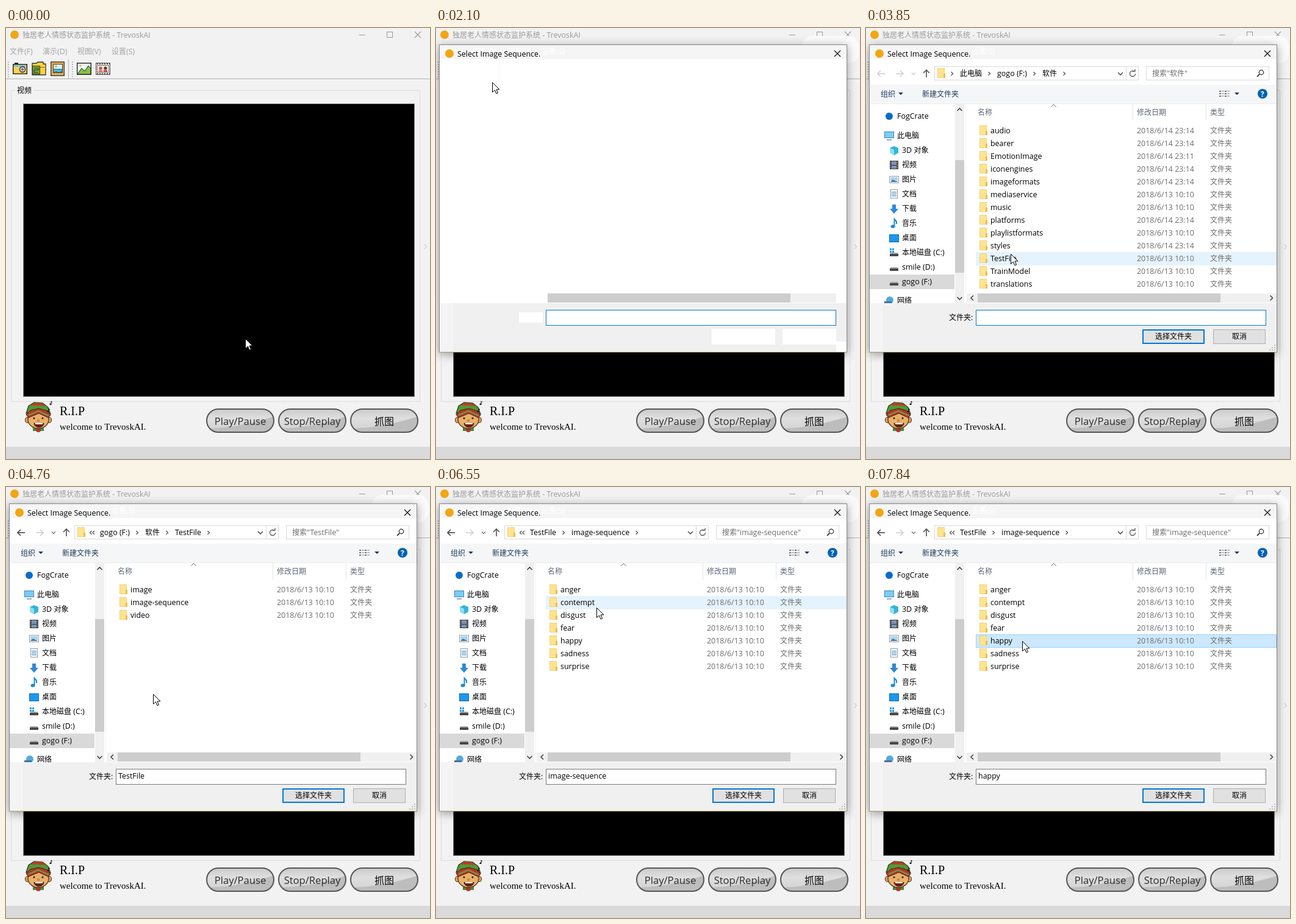
These frames come from a looping animation (695x708 px, 8 s). An HTML page with a canvas:

```html
<!DOCTYPE html>
<html lang="zh-CN">
<head>
<meta charset="utf-8">
<style>
html, body { margin: 0; width: 100%; height: 100%; overflow: hidden; background: #f2f2f2; }
canvas { display: block; width: 100vw; height: 100vh; }
</style>
</head>
<body>
<canvas id="stage" width="695" height="708"></canvas>
<script>
const ctx = document.getElementById('stage').getContext('2d', { alpha: false });
const LOOP = 8000;
const APP = 'TrevoskAI';
const MENU = [['文件(F)', 6], ['演示(D)', 60], ['视图(V)', 117], ['设置(S)', 173]];

// ---------- drawing helpers ----------
function rect(x, y, w, h, fill, stroke, width = 1) {
  if (fill) { ctx.fillStyle = fill; ctx.fillRect(x, y, w, h); }
  if (stroke) {
    ctx.strokeStyle = stroke; ctx.lineWidth = width;
    ctx.strokeRect(x + width / 2, y + width / 2, w - width, h - width);
  }
}
function shape(points, fill, stroke, width = 1, close = !!fill) {
  ctx.beginPath();
  points.forEach(([x, y]) => ctx.lineTo(x, y));
  if (close) ctx.closePath();
  if (fill) { ctx.fillStyle = fill; ctx.fill(); }
  if (stroke) { ctx.strokeStyle = stroke; ctx.lineWidth = width; ctx.stroke(); }
}
function oval(x, y, rx, ry, fill, stroke, width = 1, from = 0, to = 7) {
  ctx.beginPath();
  ctx.ellipse(x, y, rx, ry, 0, from, Math.min(to, Math.PI * 2));
  if (fill) { ctx.fillStyle = fill; ctx.fill(); }
  if (stroke) { ctx.strokeStyle = stroke; ctx.lineWidth = width; ctx.stroke(); }
}
const dot = (x, y, r, fill) => oval(x, y, r, r, fill);

// Chinese and Latin runs use slightly different sizes.
function runs(s, size) {
  return s.match(/[\u3000-\u9fff]+|[^\u3000-\u9fff]+/g).map(part => {
    const font = part[0] >= '\u3000'
      ? `${size}px "Noto Sans CJK SC", "Noto Sans CJK", sans-serif`
      : `${size * 1.037}px "Open Sans", "Noto Sans", sans-serif`;
    ctx.font = font;
    return { part, font, width: ctx.measureText(part).width };
  });
}
function text(s, x, cy, color = '#000', size = 12, centered = false) {
  const list = runs(s, size);
  const total = list.reduce((sum, r) => sum + r.width, 0);
  let at = centered ? x - total / 2 : x;
  ctx.fillStyle = color;
  for (const r of list) {
    ctx.font = r.font;
    ctx.fillText(r.part, at, cy + size * 0.37);
    at += r.width;
  }
  return total;
}
function chevron(x, y, dx, dy, color = '#555', width = 1.3) {
  const s = Math.max(Math.abs(dx), Math.abs(dy));
  const points = dx ? [[x - dx / 2, y - s], [x + dx / 2, y], [x - dx / 2, y + s]]
                    : [[x - s, y - dy / 2], [x, y + dy / 2], [x + s, y - dy / 2]];
  shape(points, null, color, width);
}
function arrow(x, y, dx, dy, color) {
  shape([[x - 6 * dx, y - 6 * dy], [x + 6 * dx, y + 6 * dy]], null, color, 1.6);
  shape([[x + dx - 5 * dy, y + dy - 5 * dx], [x + 6 * dx, y + 6 * dy],
         [x + dx + 5 * dy, y + dy + 5 * dx]], null, color, 1.6);
}
function cross(x, y, r, color) {
  shape([[x - r, y - r], [x + r, y + r]], null, color, 1.1);
  shape([[x + r, y - r], [x - r, y + r]], null, color, 1.1);
}
function folder(x, y) {
  rect(x, y, 12, 16, '#ffe38f');
  rect(x, y, 12, 16, null, '#f1d27a');
  rect(x + 10, y + 9, 3, 7, '#e9bf50');
}

// ---------- main window ----------
function toolbar(hover) {
  if (hover) rect(70, 52, 31, 31, '#d8eafa', '#9fcdf0');
  for (const x of [3, 108]) for (let y = 55; y < 81; y += 4) rect(x, y, 1.5, 2, '#aaa');
  rect(102, 51, 1, 32, '#b5b5b5');
  rect(0, 83, 695, 1, '#adadad');

  rect(11, 59, 24, 17, '#ffd34f', '#222', 1.4);
  rect(13, 61, 20, 3, '#7cc6e8');
  rect(14, 57, 6, 2, '#222');
  oval(27, 68, 4.5, 4.5, '#d9d9d9', '#222', 1.3);
  dot(27, 68, 2, '#666');

  shape([[43, 58], [50, 58], [52, 56], [61, 56], [61, 59], [65, 59], [65, 77], [43, 77]], '#ffd23f', '#333', 1.3);
  rect(43, 62, 13, 14, '#7fa92f', '#333');
  shape([[46, 66], [53, 66], [53, 69], [46, 69], [46, 73], [53, 73]], null, '#243d12', 1.2);
  rect(56, 64, 7, 1, '#8a6b12');

  rect(73, 55, 23, 24, '#f0b04c', '#3c3c3c', 1.4);
  rect(77, 59, 16, 15, '#d7f0fa', '#3c3c3c');
  rect(78, 67, 14, 6, '#2695b5');
  dot(82, 63, 2, '#f6b52e');
  shape([[78, 71], [82, 69], [86, 71], [91, 69]], null, '#bfe6f2');

  rect(116, 57, 24, 20, '#e9f6ff', '#222', 1.4);
  shape([[117, 76], [124, 66], [129, 71], [135, 62], [139, 67], [139, 76]], '#84c441', '#222');
  dot(122, 62, 1.7, '#f3b72e');

  rect(147, 57, 24, 20, '#e6dedb', '#555');
  for (let x = 149; x < 170; x += 4) { rect(x, 58, 2, 2, '#555'); rect(x, 74, 2, 2, '#555'); }
  rect(149, 61, 20, 12, '#f8e9dd', '#777');
  dot(155, 66, 2.6, '#b35c43'); dot(163, 66, 2.6, '#54343a');
  rect(152, 69, 6, 3, '#e88068'); rect(160, 69, 6, 3, '#d34f4c');
}
function elf() {
  rect(44, 653, 18, 9, '#3f8f3b');
  dot(53, 660, 4, '#b8322c');
  oval(35, 644, 3.5, 4.5, '#dca060', '#54351c');
  oval(71, 644, 3.5, 4.5, '#dca060', '#54351c');
  oval(53, 643, 17, 15, '#e9b069', '#54351c', 1.3);
  shape([[33, 633], [37, 621], [46, 615], [60, 616], [69, 623], [73, 634], [65, 630], [53, 628], [41, 630]], '#4f9a35', '#263a16', 1.2);
  shape([[39, 620], [47, 616], [60, 617], [66, 621], [52, 620]], '#c93528');
  shape([[33, 635], [40, 628], [54, 625], [68, 629], [73, 636], [69, 640], [54, 633], [37, 640]], '#b8352c', '#4b1c15', 1);
  shape([[37, 636], [53, 629], [70, 637]], null, '#66a442', 2);
  dot(46, 641, 1.6, '#222'); dot(60, 641, 1.6, '#222');
  dot(53, 645, 2.3, '#cf8746');
  oval(54, 649, 8, 7, '#6d1f1a', '#35150e', 1, 0, Math.PI);
  rect(48, 649, 12, 2, '#fff');
  for (const [x, y] of [[69, 628], [73, 616]]) {
    oval(x, y + 2, 1.6, 1.2, '#111');
    shape([[x + 1, y + 2], [x + 1, y - 3], [x + 3, y - 1]], null, '#111');
  }
}
function pillButton(x, label) {
  const y = 625, w = 112, h = 40;
  const glass = ctx.createLinearGradient(0, y, 0, y + h);
  glass.addColorStop(0, '#c9c9c9');
  glass.addColorStop(0.4, '#dfdfdf');
  glass.addColorStop(1, '#d0d0d0');
  ctx.save();
  ctx.beginPath();
  ctx.roundRect(x + 1, y + 1, w - 2, h - 2, 19);
  ctx.fillStyle = glass;
  ctx.fill();
  ctx.save();
  ctx.clip();
  ctx.beginPath();
  ctx.moveTo(x, y + 33);
  ctx.bezierCurveTo(x + 45, y + 32, x + 75, y + 24, x + w, y + 13);
  ctx.lineTo(x + w, y + h);
  ctx.lineTo(x, y + h);
  ctx.fillStyle = '#bdbdbd';
  ctx.fill();
  ctx.restore();
  ctx.beginPath();
  ctx.roundRect(x + 1, y + 1, w - 2, h - 2, 19);
  ctx.strokeStyle = '#555';
  ctx.lineWidth = 2;
  ctx.stroke();
  ctx.restore();
  text(label, x + w / 2, 646, label === '抓图' ? '#000' : '#2b2b2b', 16, true);
}
function mainWindow(t) {
  rect(0, 0, 695, 708, '#f2f2f2');
  const titleColor = t >= 590 && t < 900 ? '#000' : '#999';
  dot(14, 11, 7, '#f2a614');
  text('独居老人情感状态监护系统 - ' + APP, 27, 12, titleColor);
  rect(579, 11, 10, 1, titleColor);
  rect(624, 6, 10, 10, null, titleColor);
  cross(675, 11, 5, titleColor);
  for (const [label, x] of MENU) text(label, x, 39, t >= 590 ? '#000' : '#a3a3a3');
  toolbar(t >= 380 && t < 1490);

  rect(8, 102, 671, 512, null, '#dcdcdc');
  rect(15, 98, 30, 10, '#f2f2f2');
  text('视频', 18, 103);
  rect(28, 124, 642, 482, '#000', '#888');
  chevron(687.5, 359, 4, 0, '#bbb', 1);

  elf();
  ctx.fillStyle = '#000';
  ctx.font = '20px "Liberation Serif", serif';
  ctx.fillText('R.I.P', 88, 636);
  ctx.font = '15px "Liberation Serif", serif';
  ctx.fillText(`welcome to ${APP}.`, 88, 660);
  pillButton(328, 'Play/Pause');
  pillButton(446, 'Stop/Replay');
  pillButton(564, '抓图');
  rect(0, 688, 695, 20, '#dadada');
}

// ---------- folder contents ----------
const rows = (names, stamp = () => '2018/6/13 10:10') => names.split(' ').map(name => ({ name, date: stamp(name) }));
const software = rows(
  'audio bearer EmotionImage iconengines imageformats mediaservice music platforms playlistformats styles TestFile TrainModel translations',
  name => name === 'EmotionImage' ? '2018/6/14 23:11'
    : /^(audio|bearer|icon|imagef|platforms|styles)/.test(name) ? '2018/6/14 23:14' : '2018/6/13 10:10');
const VIEWS = [
  { from: 0, path: ['此电脑', 'gogo (F:)', '软件'], files: software },
  { from: 4620, path: ['gogo (F:)', '软件', 'TestFile'], files: rows('image image-sequence video') },
  { from: 6400, path: ['TestFile', 'image-sequence'], files: rows('anger contempt disgust fear happy sadness surprise') }
];
const PICKS = [[4230, 4620, 'TestFile'], [5870, 6400, 'image-sequence'], [7840, 8000, 'happy']];
const TREE = ['FogCrate', '此电脑', '3D 对象', '视频', '图片', '文档', '下载', '音乐', '桌面',
  '本地磁盘 (C:)', 'smile (D:)', 'gogo (F:)', '网络'].map((name, i) => ({
  name,
  child: i > 1 && i < 12,
  y: i === 0 ? 145 : i === 12 ? 448 : 153 + i * 24
}));

function treeIcon(i, x, y) {
  const blue = '#1e88d8';
  switch (i) {
    case 0: dot(x, y, 6, '#0a6cc9'); break;
    case 1: rect(x - 8, y - 7, 16, 11, '#7ccbf7', '#3c89b8'); rect(x - 4, y + 6, 8, 1.5, '#6f8c9c'); break;
    case 2:
      shape([[x - 7, y - 4], [x, y - 7], [x + 7, y - 4], [x + 7, y + 4], [x, y + 8], [x - 7, y + 4]], '#35b4d8');
      shape([[x - 7, y - 4], [x, y - 1], [x, y + 8], [x - 7, y + 4]], '#8ee0ef'); break;
    case 3:
      rect(x - 7, y - 7, 14, 14, '#444');
      rect(x - 4, y - 6, 8, 12, '#7d93b8'); rect(x - 4, y, 8, 1, '#333');
      for (let k = -5; k < 6; k += 3) { rect(x - 6, y + k, 1, 1, '#eee'); rect(x + 5, y + k, 1, 1, '#eee'); } break;
    case 4:
      rect(x - 8, y - 6, 16, 12, '#fff', '#999'); rect(x - 6, y - 4, 12, 8, '#a9d6f2');
      shape([[x - 6, y + 4], [x - 2, y], [x + 6, y + 4]], '#46769a'); break;
    case 5:
      rect(x - 6, y - 8, 12, 15, '#fff', '#8b9aa5');
      for (let k = -4; k < 5; k += 3) rect(x - 4, y + k, 8, 1.3, '#4a90c2'); break;
    case 6:
      shape([[x - 3, y - 7], [x + 3, y - 7], [x + 3, y], [x + 7, y], [x, y + 8], [x - 7, y], [x - 3, y]], '#2f86dd'); break;
    case 7:
      oval(x - 2, y + 5, 3.5, 2.7, blue);
      shape([[x + 0.5, y + 5], [x + 0.5, y - 7], [x + 4, y - 3], [x + 4, y + 1]], null, blue, 2); break;
    case 8: rect(x - 8, y - 6, 16, 13, '#1b97ee', '#0f6bb0'); break;
    case 12:
      oval(x + 1, y - 1, 6, 6, '#55a9de'); rect(x - 8, y + 1, 12, 8, '#3478a8', '#5a6b78'); break;
    default:
      shape([[x - 6, y], [x + 6, y], [x + 7, y + 4], [x - 7, y + 4]], '#aaa');
      rect(x - 7, y + 2, 14, 4, '#484848');
      if (i === 9) for (const [a, b] of [[0, 0], [4, 0], [0, 4], [4, 4]]) rect(x - 7 + a, y - 7 + b, 3, 3, '#1b9be8');
  }
}

// ---------- dialog ----------
function dialogFrame() {
  ctx.beginPath();
  ctx.roundRect(600, 13, 93, 45, 16);
  ctx.fillStyle = '#fafafa';
  ctx.fill();
  ctx.save();
  ctx.shadowColor = 'rgba(0,0,0,.38)';
  ctx.shadowBlur = 14;
  ctx.shadowOffsetY = 3;
  rect(5, 27, 669, 506, '#fff');
  ctx.restore();
  rect(5, 27, 669, 506, null, '#868686');
  rect(5, 532, 669, 1, '#a99b69');
  rect(6, 28, 667, 23, '#f5f5f5');
  for (const [label, x] of MENU) text(label, x, 39, '#fff');
  dot(22, 42, 7, '#f2a614');
  text('Select Image Sequence.', 35, 43);
  cross(658, 42, 5, '#000');
  rect(6, 452, 667, 80, '#f0f0f0');
  rect(6, 452, 22, 80, '#f4f4f4');
  rect(183, 436, 473, 15, '#f0f0f0');
  rect(183, 436, 398, 15, '#cdcdcd');
}
function blankControls(t) {
  rect(103, 51, 1, 32, '#f5f5f5');
  rect(136, 467, 39, 17, '#fff');
  rect(180, 463, 476, 26, '#fff', '#0078d7');
  rect(452, 494, 104, 26, '#fff');
  rect(568, 494, 88, 26, '#fff');
  rect(656, 515, 17, 17, '#fff');
  if (t >= 2410) sideScrollbar();
}
function sideScrollbar() {
  rect(146, 125, 15, 327, '#f0f0f0');
  rect(146, 217, 15, 185, '#cdcdcd');
  chevron(153.5, 134, 0, -4, '#444', 1.6);
  chevron(153.5, 444, 0, 4, '#444', 1.6);
}
function navigation(view, depth) {
  arrow(25, 75, -1, 0, depth ? '#444' : '#d0d0d0');
  arrow(55, 75, 1, 0, '#d0d0d0');
  chevron(78, 75, 0, 3, depth ? '#777' : '#c8c8c8');
  arrow(99, 75, 0, -1, '#555');
  rect(112, 63, 335, 23, '#fff', '#d9d9d9');
  rect(426, 63, 1, 23, '#d9d9d9');
  folder(117, 66);
  if (depth) { chevron(139, 75, -3, 0); chevron(143.5, 75, -3, 0); }
  else chevron(141, 75, 3, 0);
  let x = 154;
  for (const name of view.path) {
    const width = text(name, x, 75);
    chevron(x + width + 12, 75, 3, 0);
    x += width + 25;
  }
  chevron(417, 75, 0, 4, '#555', 1.6);
  oval(437, 75, 4.5, 4.5, null, '#555', 1.3, 0, 5.2);
  shape([[437, 71], [441, 71], [441, 67.5]], null, '#555', 1.3);
  rect(459, 63, 202, 23, '#fff', '#d9d9d9');
  text(`搜索"${view.path[view.path.length - 1]}"`, 469, 75, '#6d6d6d');
  oval(648, 73, 3.7, 3.7, null, '#444', 1.4);
  shape([[645, 76], [641, 80]], null, '#444', 2);

  rect(6, 93, 667, 31, '#f5f6f7');
  rect(6, 124, 667, 1, '#ececec');
  text('组织', 24, 109, '#1e395b');
  shape([[53, 106], [61, 106], [57, 110]], '#1e395b');
  text('新建文件夹', 92, 109, '#1e395b');
  for (let y = 103; y < 114; y += 4) {
    for (const column of [579, 588]) {
      rect(column, y, 3, 2, '#777');
      rect(column + 4, y, 4, 1.5, '#aaa');
    }
  }
  shape([[604, 106], [612, 106], [608, 110]], '#1e395b');
  dot(650, 108, 8, '#0063b1');
  ctx.font = 'bold 12px "Open Sans", sans-serif';
  ctx.fillStyle = '#fff';
  ctx.fillText('?', 647, 112.5);
}
function tree(t, cursor) {
  ctx.save();
  ctx.beginPath();
  ctx.rect(6, 125, 140, 327);
  ctx.clip();
  rect(6, 405, 139, 24, '#d9d9d9');
  TREE.forEach((item, i) => {
    const hovered = t >= 3110 && cursor[0] < 145 && Math.abs(cursor[1] - item.y) < 12;
    if (hovered && i !== 11) rect(6, item.y - 12, 139, 24, '#e5f3ff');
    const x = item.child ? 46 : 38;
    if (t >= 3260) treeIcon(i, x, item.y);
    else if (i > 8 && i < 12) {
      shape([[40.5, item.y - 7], [48, item.y - 7], [51.5, item.y - 4], [51.5, item.y + 7], [40.5, item.y + 7]], '#fff', '#888');
    }
    text(item.name, item.child ? 59 : 51, item.y);
  });
  ctx.restore();
  sideScrollbar();
}
function fileList(view, cursor, picked) {
  text('名称', 183, 139, '#5b6675');
  text('修改日期', 444, 139, '#5b6675');
  text('类型', 564, 139, '#5b6675');
  rect(163, 125, 1, 311, '#f3f3f3');
  rect(437, 125, 1, 27, '#e5e5e5');
  rect(557, 125, 1, 27, '#e5e5e5');
  chevron(307.5, 127.5, 0, -4, '#666', 1);
  const hovered = cursor[0] >= 180 ? Math.floor((cursor[1] - 158) / 21) : -1;
  view.files.forEach((file, i) => {
    const top = 158 + 21 * i;
    if (file.name === picked) rect(180, top, 493, 22, '#cce8ff', '#99d1ff');
    else if (i === hovered) rect(180, top, 493, 22, '#e5f3ff');
    folder(186, top + 2);
    text(file.name, 204, top + 11);
    text(file.date, 444, top + 11, '#6d6d6d');
    text('文件夹', 564, top + 11, '#6d6d6d');
  });
  rect(165, 436, 18, 15, '#f0f0f0');
  rect(656, 436, 17, 15, '#f0f0f0');
  chevron(174, 443.5, -4, 0, '#444', 1.6);
  chevron(664.5, 443.5, 4, 0, '#444', 1.6);
}
function footer(t, value) {
  text('文件夹:', 136, 476);
  rect(180, 463, 476, 26, '#fff', value ? '#7a7a7a' : '#0078d7');
  if (value) text(value, 184, 475);
  else if ((t - 2870) % 1060 < 600) rect(184, 467, 1, 16, '#000');
  rect(453, 495, 102, 24, '#e1e1e1', '#0078d7', 2);
  text('选择文件夹', 504, 507, '#000', 12, true);
  rect(569, 495, 86, 24, '#e1e1e1', '#adadad');
  text('取消', 612, 507, '#000', 12, true);
  for (let r = 0; r < 3; r++) for (let c = 0; c <= r; c++) rect(669 - 4 * c, 520 + 4 * r, 2, 2, '#bbb');
}
function dialog(t, cursor) {
  ctx.save();
  if (t < 2100) ctx.globalAlpha = 0.5;
  dialogFrame();
  if (t < 2650) blankControls(t);
  else {
    const depth = VIEWS.filter(v => t >= v.from).length - 1;
    const view = VIEWS[depth];
    const pick = PICKS.find(([from, to]) => t >= from && t < to);
    const last = PICKS.filter(([from]) => t >= from).pop();
    navigation(view, depth);
    tree(t, cursor);
    fileList(view, cursor, pick && pick[2]);
    footer(t, last && last[2]);
  }
  ctx.restore();
}

// ---------- pointer ----------
const POINTER = [
  [0, 392, 510], [50, 392, 510], [380, 60, 80], [450, 76, 78], [590, 76, 80], [670, 77, 81], [820, 77, 81],
  [1050, 78, 79], [1340, 78, 79], [1350, 82, 82], [1490, 82, 82], [1570, 84, 86], [1720, 84, 86],
  [1880, 92, 89], [3100, 92, 89], [3110, 143, 134], [3180, 143, 134], [3850, 237, 371], [4620, 236, 371],
  [5370, 262, 207], [5510, 262, 203], [5660, 263, 198], [7130, 263, 198], [7690, 256, 253], [LOOP, 256, 253]
];
function pointerAt(t) {
  const i = POINTER.findIndex(p => p[0] > t);
  const [t0, x0, y0] = POINTER[i - 1], [t1, x1, y1] = POINTER[i];
  const k = (t - t0) / (t1 - t0);
  return [Math.round(x0 + (x1 - x0) * k), Math.round(y0 + (y1 - y0) * k)];
}
function pointer([x, y]) {
  const outline = [[0, 0], [0, 16], [4, 12.5], [6.5, 18.5], [9, 17.5], [6.5, 11.5], [11.5, 11.5]];
  shape(outline.map(([dx, dy]) => [x + dx + 0.5, y + dy + 0.5]), '#fff', '#000');
}

function draw(now) {
  const t = now % LOOP;
  const cursor = pointerAt(t);
  mainWindow(t);
  if (t >= 2020) dialog(t, cursor);
  pointer(cursor);
  requestAnimationFrame(draw);
}
const start = performance.now();
requestAnimationFrame(function first() { draw(Math.max(0, performance.now() - start)); });
</script>
</body>
</html>
```
